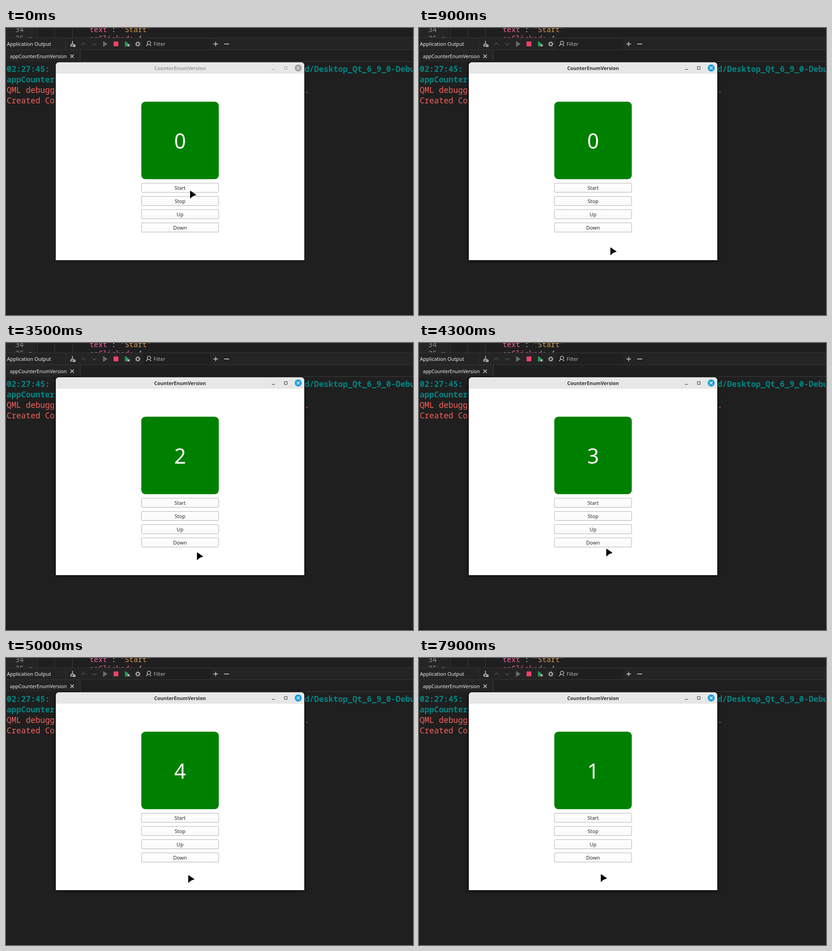
An HTML page for the animation above (8 s loop, 891x628 px).

```html
<!DOCTYPE html>
<html lang="en">
<head>
<meta charset="utf-8">
<title>Counter demo</title>
<style>
  html, body { margin: 0; width: 100%; height: 100%; overflow: hidden; background: #1f1f1f; }
  svg { display: block; width: 891px; height: 628px; }
  text { font-family: "Noto Sans", "Open Sans", sans-serif; white-space: pre; }
  .mono text { font-family: "Noto Sans Mono", "DejaVu Sans Mono", monospace; }
  .code { font-size: 16.05px; }
  .log { font-size: 17.53px; fill: #f2615b; }
  .log .cmd { fill: #048583; font-weight: bold; }
  .ui { font-size: 10.9px; fill: #eee; }
  .line { fill: none; stroke: #dcdcdc; stroke-width: 1.3; }
  .dim { stroke: #555; }
  .mid { text-anchor: middle; }
  #win { filter: drop-shadow(0 0 1px rgba(0,0,0,.5)); --ink: #a0a0a0; --close: #a3a3a3; --mark: #e7e7e7; }
  #win.active { filter: drop-shadow(0 1px 3px #000); --ink: #303030; --close: #1f9ede; --mark: #fff; }
  #title { font-size: 10.6px; font-weight: bold; fill: var(--ink); }
  .frame { fill: none; stroke: var(--ink); }
  #close { fill: var(--close); }
  #cross { stroke: var(--mark); stroke-width: 1.3; }
  .btn rect { fill: url(#face); stroke: #b0b0b0; }
  .btn text { font-size: 11px; font-weight: 500; fill: #2a2a2a; }
  .btn.hover rect { fill: #fff; }
  .btn.down rect { fill: #d6d6d6; stroke: #a0a0a0; }
  #count { font-size: 45px; font-weight: 500; fill: #fff; }
</style>
</head>
<body>
<svg viewBox="0 0 891 628">
  <defs>
    <linearGradient id="face" x2="0" y2="1">
      <stop stop-color="#fff"/><stop offset="1" stop-color="#f9f9f9"/>
    </linearGradient>
    <clipPath id="editor"><path d="M0 0H891V21H0z"/></clipPath>
  </defs>
  <rect width="891" height="628" fill="#1f1f1f"/>

  <g class="mono code" clip-path="url(#editor)">
    <path d="M0 0H65V21H0z" fill="#252525"/>
    <path d="M68.5 0V21M106.5 0V21M145.5 0V21" stroke="#3c3c3c"/>
    <text x="20" y="9" fill="#8c8c8c">34</text>
    <text x="20" y="29" fill="#8c8c8c">35</text>
    <path d="M50 20h7l-3.5 4z" fill="#777"/>
    <text x="183" y="9" fill="#f0609f">text <tspan fill="#d0d0d0">: </tspan><tspan fill="#d69a52">"Start"</tspan></text>
    <text x="183" y="29" fill="#f0609f">onClicked<tspan fill="#d0d0d0">: {</tspan></text>
  </g>

  <g id="toolbar">
    <path d="M0 21H891V48H0z" fill="#242424"/>
    <path d="M301 23H447V47H301z" fill="#1f1f1f"/>
    <path d="M0 21.5H891M0 47.5H891M130.5 22V47" stroke="#363636"/>
    <text class="ui" x="2" y="39">Application Output</text>
    <path class="line" d="M145.5 28V35M141.5 39.5L142.5 35.5H148.5V39.5zM148 37.5H151.5V40.5H147"/>
    <path class="line dim" d="M165 37l4.5-4.5 4.5 4.5M189 33l4.5 4.5 4.5-4.5"/>
    <path d="M212.5 28.5L222.5 35L212.5 41.5z" fill="#6b6b6b"/>
    <path d="M235.5 29.5h10.5v10.5h-10.5z" fill="#ee4268"/>
    <path d="M260.5 28.5L270 35L260.5 41.5z" fill="#1fa05a"/>
    <ellipse cx="268" cy="38" rx="2.2" ry="3" fill="#cfcfcf" stroke="#242424"/>
    <path d="M264 36l8 4M264 40l8-4" stroke="#cfcfcf" stroke-width=".8"/>
    <circle class="line" cx="288.5" cy="35" r="3.2"/>
    <circle class="line" cx="288.5" cy="35" r="4.8" stroke-dasharray="1.9 1.87"/>
    <circle class="line" cx="313" cy="32.5" r="3.7"/>
    <path class="line" d="M310.5 35.5L306.5 39.5M315 38.5h3"/>
    <text class="ui" x="323" y="38.5" style="fill:#b4b4b4">Filter</text>
    <path class="line" d="M454 35H464M459 30V40M477.5 35H488.5"/>
  </g>

  <g id="tab">
    <path d="M0 48H162V74H0z" fill="#242424"/>
    <path d="M162.5 48V73.5H891" fill="none" stroke="#3d3d3d"/>
    <text class="ui" x="8.5" y="65.5" style="font-size:10.5px">appCounterEnumVersion</text>
    <path class="line" d="M141 58l7.5 7.5M148.5 58l-7.5 7.5"/>
  </g>

  <g class="mono log">
    <text class="cmd" x="1.5" y="96">02:27:45:</text>
    <text class="cmd" x="653.5" y="96">d/Desktop_Qt_6_9_0-Debug</text>
    <text class="cmd" x="1.5" y="119">appCounter</text>
    <text x="1.5" y="142">QML debugg</text>
    <text x="653.5" y="142">.</text>
    <text x="1.5" y="165">Created Co</text>
  </g>
  <path d="M0 627.5H891" stroke="#181818"/>

  <g id="win">
    <path d="M109 508V83q0-8 8-8H645q8 0 8 8V508z" fill="#fff"/>
    <path d="M109 100V83q0-8 8-8H645q8 0 8 8V100z" fill="#e7e7e7"/>
    <text id="title" class="mid" x="381" y="91.5">CounterEnumVersion</text>
    <path class="frame" d="M582 90.5H589M609.5 84.5h6v6h-6z"/>
    <circle id="close" cx="639.7" cy="87.5" r="7.7"/>
    <path id="cross" d="M636.7 84.5l6 6M642.7 84.5l-6 6"/>
    <rect x="296.2" y="161.2" width="169.6" height="169.6" rx="9" fill="#008000"/>
    <text id="count" class="mid" x="381" y="263.5">0</text>
    <g id="buttons"></g>
  </g>

  <path id="cursor" d="M1 1.2Q1-.3 2.2.5L13.8 8.6Q14.8 9.7 13.4 10Q7 11 2.6 16.2Q1 17.4 1 15.8z"/>
</svg>
<script>
const LOOP = 8000, TICK = 100, STARTED = 600, PEAK = 4;
const CLICKS = [500, 4600];
const $ = id => document.getElementById(id);

// The pointer glides between these stops: time, x, y
const stops = [
  [0, 402, 356], [300, 402, 354], [600, 402, 354], [900, 418, 480],
  [1000, 418, 480], [1300, 418, 465], [1800, 418, 461], [2800, 418, 461],
  [3600, 417, 458], [4300, 409, 450], [4500, 404, 438], [4700, 404, 438],
  [5000, 398, 475], [LOOP, 397, 473]
];

const buttons = ["Start", "Stop", "Up", "Down"].map((label, i) => {
  const top = 339 + 29 * i;
  $("buttons").insertAdjacentHTML("beforeend",
    `<g class="btn"><rect x="296.5" y="${top + .5}" width="169" height="20" rx="1"/>
     <text class="mid" x="381" y="${top + 15}">${label}</text></g>`);
  return { node: $("buttons").lastElementChild, top };
});

function pointerAt(t) {
  const next = stops.findIndex(stop => stop[0] > t);
  const [t0, x0, y0] = stops[next - 1], [t1, x1, y1] = stops[next];
  const k = (t - t0) / (t1 - t0);
  return [x0 + (x1 - x0) * k, y0 + (y1 - y0) * k].map(Math.round);
}

// One count per second, upwards to the peak and then back down
function countAt(t) {
  const seconds = Math.max(0, Math.floor((t - STARTED) / 1000));
  return PEAK - Math.abs(PEAK - seconds);
}

function draw(t) {
  const [x, y] = pointerAt(t);
  $("cursor").setAttribute("transform", `translate(${x} ${y})`);
  $("count").textContent = countAt(t);
  $("win").classList.toggle("active", t >= CLICKS[0]);
  for (const { node, top } of buttons) {
    const over = y >= top && y < top + 21;
    node.classList.toggle("hover", over);
    node.classList.toggle("down", over && CLICKS.includes(t));
  }
}

const start = performance.now();
function frame() {
  const t = (performance.now() - start) % LOOP;
  draw(Math.floor(t / TICK) * TICK);
  requestAnimationFrame(frame);
}
frame();
</script>
</body>
</html>
```
